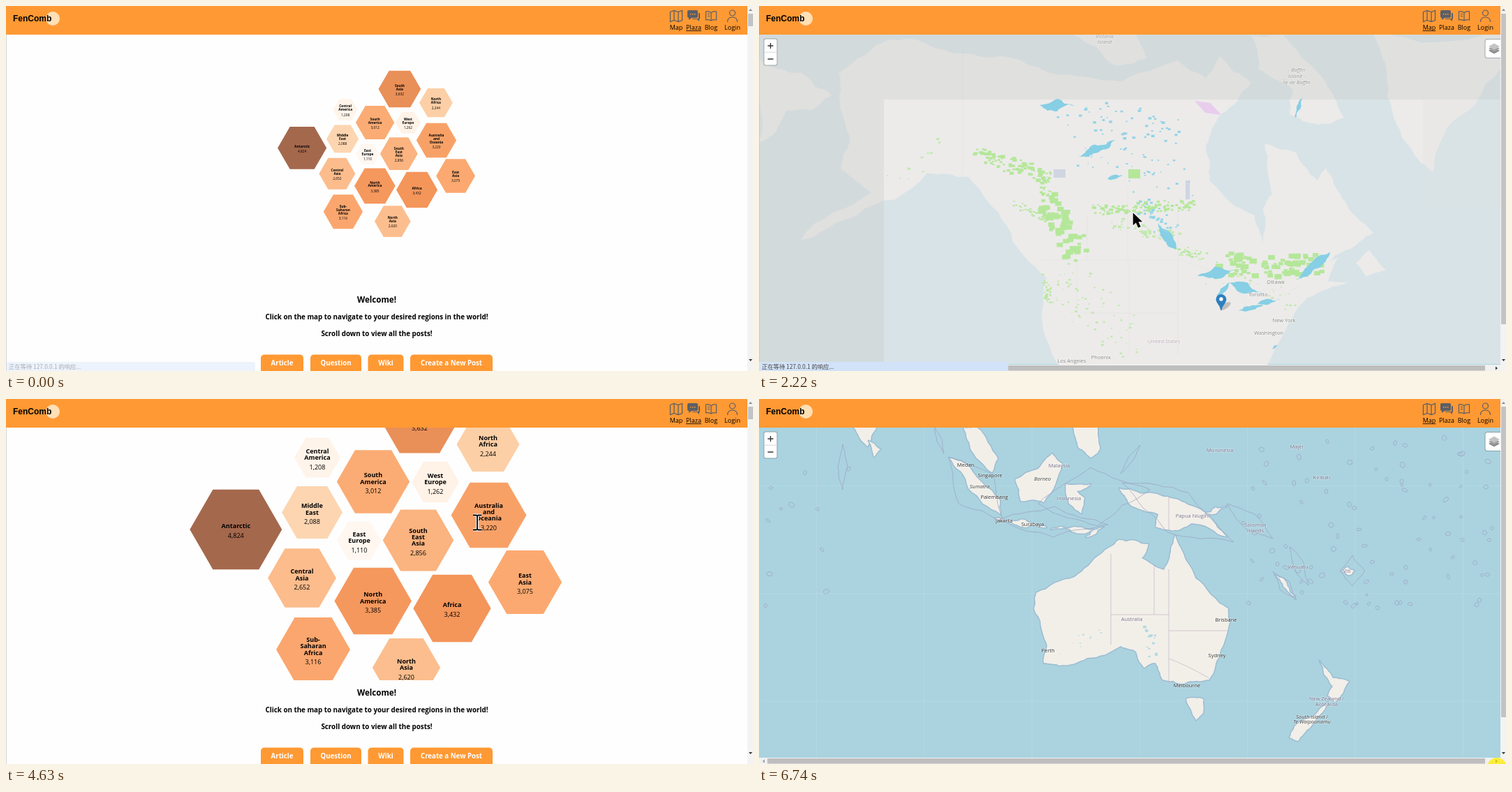
Animation of 1070 by 523 pixels, one loop 6.84 s. Source, as an HTML page with a canvas:

```html
<!DOCTYPE html>
<html lang="en">
<head>
<meta charset="utf-8">
<style>
html, body { margin: 0; overflow: hidden; background: #fff; }
canvas { display: block; width: 1070px; height: 523px; }
</style>
</head>
<body>
<canvas id="stage" width="1070" height="523"></canvas>
<script>
const g = document.getElementById('stage').getContext('2d');
const LOOP = 6840, CX = 531.5, CY = 222;
const SANS = '"Open Sans", "Noto Sans", sans-serif';
const CJK = '"Noto Sans CJK SC", "Noto Sans CJK", sans-serif';

const clamp = v => Math.max(0, Math.min(1, v));
const mix = (a, b, k) => a + (b - a) * k;
const ease = (t, a, b) => (1 - Math.cos(Math.PI * clamp((t - a) / (b - a)))) / 2;

function rng(seed) {
  return () => (seed = (seed * 16807) % 2147483647) / 2147483647;
}
function rect(x, y, w, h, color) {
  g.fillStyle = color;
  g.fillRect(x, y, w, h);
}
function round(x, y, w, h, r, color) {
  g.fillStyle = color;
  g.beginPath();
  g.roundRect(x, y, w, h, r);
  g.fill();
}
function oval(x, y, rx, ry = rx, turn = 0) {
  g.beginPath();
  g.ellipse(x, y, rx, ry, turn, 0, 7);
}
function disc(x, y, r, color) {
  g.fillStyle = color;
  oval(x, y, r);
  g.fill();
}
// Text centred vertically on y
function text(s, x, y, size, color = '#000', style = '', align = 'center', family = SANS) {
  g.font = `${style} ${size}px ${family}`;
  g.textAlign = align;
  g.fillStyle = color;
  g.fillText(s, x, y + size * 0.36);
}
const asPath = d => d instanceof Path2D ? d : new Path2D(d);
function fill(d, color) {
  g.fillStyle = color;
  g.fill(asPath(d));
}
function line(d, color, width = 1) {
  g.strokeStyle = color;
  g.lineWidth = width;
  g.stroke(asPath(d));
}
function label(list, color, style = '') {
  for (const [s, x, y] of list) {
    g.font = `${style} 7.5px ${SANS}`;
    g.textAlign = 'center';
    g.strokeStyle = 'rgba(255,255,255,.4)';
    g.lineWidth = 1.5;
    g.strokeText(s, x, y + 2.7);
    text(s, x, y, 7.5, color, style);
  }
}

// ---- Hive page ----

const cells = [
  ['South Asia', 3632, 592.5, 28],
  ['Central America', 1208, 446, 84],
  ['North Africa', 2244, 690.5, 65],
  ['South America', 3012, 526, 118.5],
  ['West Europe', 1262, 615, 119],
  ['Middle East', 2088, 438.5, 162.5],
  ['Australia and Oceania', 3220, 691.5, 166.5],
  ['Antarctic', 4824, 329.3, 187],
  ['East Europe', 1110, 506, 203],
  ['South East Asia', 2856, 590.5, 202.5],
  ['Central Asia', 2652, 424, 256.5],
  ['East Asia', 3075, 743.5, 262.5],
  ['North America', 3385, 525.7, 289.5],
  ['Africa', 3432, 639, 300],
  ['Sub- Saharan Africa', 3116, 440, 359],
  ['North Asia', 2620, 573.5, 385]
].map(([name, count, x, y]) => ({ name, count, x, y }));
const cellOf = name => cells.find(c => c.name === name);

// Colour scale by count
const scale = [[1110, 255, 247, 240], [2250, 253, 207, 166], [3050, 251, 170, 114], [3432, 244, 149, 90], [4824, 164, 104, 77]];
function shade(count) {
  const i = Math.max(1, scale.findIndex(s => s[0] >= count));
  const [a, ...from] = scale[i - 1], [b, ...to] = scale[i];
  return `rgb(${from.map((v, j) => Math.round(mix(v, to[j], (count - a) / (b - a))))})`;
}

function drawCell({ name, count, x, y }) {
  const r = 0.95 * Math.sqrt(count);
  g.beginPath();
  for (let a = 0; a < 6; a++) g.lineTo(x + r * Math.cos(a * Math.PI / 3), y + r * Math.sin(a * Math.PI / 3));
  g.fillStyle = shade(count);
  g.fill();
  const words = name.split(' '), half = 4.55 * (words.length - 1);
  words.forEach((w, i) => text(w, x, y - 4.8 - half + 9.1 * i, 9.05, '#000', 'bold'));
  text(count.toLocaleString('en-US'), x, y + 9 + half, 9.05);
}

// Zooms on the middle first, then carries the chosen cell into the middle
function hive(t, load, jump, target) {
  const z = mix(0.531, 1, ease(t, load + 285, load + 1365));
  const e = ease(t, jump, jump + 520);
  g.save();
  g.beginPath();
  g.rect(260, 41, 543, 362);
  g.clip();
  g.translate(CX + (1 - e) * z * (target.x - CX), CY + (1 - e) * z * (target.y - CY));
  g.scale(z + 2 * e, z + 2 * e);
  g.translate(-target.x, -target.y);
  cells.forEach(drawCell);
  g.restore();
}

function header(active) {
  rect(0, 0, 1062, 41, '#ff9933');
  disc(67, 18, 10, '#ffdfb5');
  text('FenComb', 10, 18, 12, '#000', 'bold', 'left', '"Liberation Sans", sans-serif');
  const ink = '#5c5f66';
  line('M951.5 8.5l5.5-2 6 2 5.5-2v14l-5.5 2-6-2-5.5 2zM957 6.5v14M963 8.5v14', ink, 1.3);
  fill('M978 6h11q2 0 2 2v7q0 2-2 2h-7l-4 3v-3q-2 0-2-2V8q0-2 2-2z', ink);
  fill('M992 10h1q1 0 1 1v7q0 1-1 1v3l-3-3h-8l2-1h8z', ink);
  for (const x of [980, 983, 986]) rect(x, 11, 1.5, 1.5, '#ff9933');
  line('M1010 9.5q-4-2.5-7.5-1.5v12q3.5-1 7.5 1 3.5-2 7.5-1V8q-3.5-1-7.5 1.5zv11.5M1005 11l3 1M1005 14l3 1', ink, 1.2);
  line('M1044.5 10a4 4 0 1 0-8 0a4 4 0 1 0 8 0M1033.5 23q0-7 7-7t7 7', ink, 1.2);
  for (const [s, x] of [['Map', 960], ['Plaza', 985], ['Blog', 1010], ['Login', 1040.5]]) {
    text(s, x, 31, 9);
    const w = g.measureText(s).width;
    if (s === active) rect(x - w / 2, 35, w, 0.8, '#000');
  }
}

function scrollbar(h) {
  rect(1062, 0, 8, 523, '#f3f3f3');
  rect(1063, 11, 7, h, '#c3c3c6');
  fill('M1064 7h5l-2.5-3z', '#888');
  fill('M1064 506h5l-2.5 3z', '#333');
}

function status(alpha) {
  g.globalAlpha = alpha;
  round(0, 510, 357, 13, [0, 3, 0, 0], '#d2e2f8');
  text('正在等待 127.0.0.1 的响应...', 4, 517, 8.3, '#444', '', 'left', CJK);
  g.globalAlpha = 1;
}

function plaza(t, load, jump, target) {
  rect(0, 0, 1070, 523, '#fefefe');
  hive(t, load, jump, cellOf(target));
  header('Plaza');
  const age = t - load;
  g.globalAlpha = clamp((age - 200) / 100) * clamp((1100 - age) / 120);
  round(487, 9, 89, 19, 3, '#c5525b');
  text('Must be logged in!', 531.5, 18.5, 8.2, '#fff');
  g.globalAlpha = 1;
  text('Welcome!', 531, 421, 11.6, '#000', 'bold');
  text('Click on the map to navigate to your desired regions in the world!', 531, 445, 9.8, '#000', 'bold');
  text('Scroll down to view all the posts!', 531, 469, 9.8, '#000', 'bold');
  for (const [s, x, w] of [['Article', 365, 61], ['Question', 436, 73], ['Wiki', 518.5, 51], ['Create a New Post', 579, 118]]) {
    round(x, 499.5, w, 24, [5, 5, 0, 0], '#ff9933');
    text(s, x + w / 2, 511.5, 9.7, '#fff', 'bold');
  }
  rect(0, 41, 0.8, 482, '#ccc');
  scrollbar(18);
  if (load === 0) status(0.4 * clamp((200 - t) / 100));
}

// ---- Maps ----

const SEA = '#aad3df', LAND = '#f2efe9';
const rough = rng(31);

// Closed shoreline: a few key points, roughened by midpoint displacement
function coast(points, amount = 0.09) {
  const n = points.match(/[\d.]+/g).map(Number);
  let p = n.filter((_, i) => i % 2 === 0).map((x, i) => [x, n[2 * i + 1]]);
  for (let pass = 0; pass < 3; pass++) {
    p = p.flatMap(([x, y], i) => {
      const [u, v] = p[(i + 1) % p.length], k = (rough() - 0.5) * 2 * amount;
      return [[x, y], [(x + u) / 2 + (v - y) * k, (y + v) / 2 - (u - x) * k]];
    });
  }
  return new Path2D('M' + p.map(q => q.join(' ')).join('L') + 'z');
}
// Sliver from a to b, swelling by w on each side
function lens(ax, ay, bx, by, w, amount = 0.15) {
  const k = w / Math.hypot(bx - ax, by - ay), mx = (ax + bx) / 2, my = (ay + by) / 2;
  const dx = (by - ay) * k, dy = (ax - bx) * k;
  return coast(`${ax} ${ay}, ${mx + dx} ${my + dy}, ${bx} ${by}, ${mx - dx} ${my - dy}`, amount);
}
// Blocky patches strewn along a line
function strew(r, ax, ay, bx, by, spread, n = 10 + 0.6 * Math.hypot(bx - ax, by - ay), size = spread * 0.7) {
  for (let i = 0; i < n; i++) {
    const q = r(), w = size * mix(0.4, 1, r());
    g.fillRect(mix(ax, bx, q) + (r() - 0.5) * 2 * spread - w / 2, mix(ay, by, q) + (r() - 0.5) * 2 * spread - w / 3, w, w * 0.7);
  }
}

const america = [
  '0 75, 60 95, 104 128, 75 150, 40 150, 20 185, 0 195',
  '115 95, 185 48, 290 68, 400 88, 520 108, 600 78, 640 103, 660 72, 705 110, 662 155, 640 200, 645 250, 710 300, 720 340, 722 290, 735 270, 724 198, 770 210, 800 250, 812 232, 835 275, 880 325, 840 350, 785 380, 830 360, 815 395, 845 395, 785 418, 765 445, 715 530, 440 530, 405 440, 412 390, 355 315, 300 245, 240 240, 140 300, 60 335, 160 268, 118 235, 130 195, 115 130',
  '855 368, 875 350, 898 378, 870 388',
  '705 41, 750 41, 805 100, 838 160, 800 170, 760 155, 765 120, 715 90',
  '450 41, 540 41, 555 75, 510 85',
  '880 41, 900 130, 935 205, 965 238, 985 175, 1062 90, 1062 41'
].map(p => coast(p));
const lakes = [
  [402, 142, 452, 142, 9], [457, 216, 511, 192, 6], [497, 248, 522, 241, 3], [572, 311, 597, 349, 7],
  [628, 386, 682, 378, 9], [655, 418, 674, 396, 4], [674, 397, 722, 412, 8], [687, 437, 722, 429, 3],
  [714, 427, 746, 420, 4], [773, 391, 818, 352, 6], [768, 160, 778, 132, 3], [735, 491, 743, 485, 2]
].map(a => lens(...a));
const woods = [
  [418, 285, 455, 350, 17], [366, 282, 410, 308, 5], [312, 208, 345, 225, 8], [350, 225, 415, 245, 10],
  [408, 245, 412, 275, 7], [480, 293, 625, 285, 8], [600, 350, 638, 358, 6], [670, 368, 700, 372, 16],
  [730, 375, 795, 368, 15], [412, 395, 415, 425, 5]
];

function northAmerica(k) {
  rect(0, 41, 1062, 482, SEA);
  america.forEach(d => fill(d, LAND));
  line('M292 65V240M405 364H605L680 390 700 435 745 420 775 400M470 300V364M528 260V364M600 290V364M455 364V440H600M530 364V500M600 364V500', 'rgba(160,140,160,.22)');
  // Loading tiles
  const old = `rgba(221,221,221,${0.8 * k})`;
  rect(0, 41, 1062, 93, old);
  rect(0, 134, 179, 379, old);
  rect(179, 134, 883, 379, `rgba(235,235,235,${0.72 * k})`);
  rect(951, 134, 111, 154, `rgba(221,221,221,${0.2 * k})`);
  const r = rng(77);
  g.fillStyle = '#b5e79a';
  for (const w of woods) strew(r, ...w);
  rect(529, 234, 17, 13, '#b5e79a');
  g.fillStyle = '#c4e8b0';
  strew(r, 420, 390, 540, 480, 30, 70, 4);
  strew(r, 510, 308, 600, 335, 10, 45, 5);
  strew(r, 660, 380, 780, 410, 30, 35, 4);
  strew(r, 190, 255, 270, 195, 12, 10, 5);
  fill(lens(624, 136, 662, 156, 8, 0), '#e9cdec');
  rect(422, 234, 17, 12, '#cfd6e2');
  rect(611, 250, 6, 27, '#cfd6e2');
  lakes.forEach(d => fill(d, '#86cfe4'));
  g.fillStyle = '#93d3e6';
  strew(r, 440, 150, 600, 180, 22, 50, 5);
  strew(r, 470, 210, 610, 250, 25, 40, 4);
  strew(r, 540, 270, 600, 330, 16, 35, 5);
  label([['Victoria', 495, 43], ['Island', 495, 51], ['- Baffin', 770, 91], ['Island -', 770, 100], ['Île de Baffin', 770, 109]], '#999', 'italic');
  label([['United States', 580, 480]], '#b9a9b5');
  label([['Ottawa', 740, 395], ['Toronto', 715, 413], ['New York', 752, 450], ['Washington', 730, 468], ['Phoenix', 490, 503], ['Los Angeles', 448, 508]], '#888');
  g.fillStyle = 'rgba(60,60,60,.25)';
  oval(668, 430, 9, 3.5, -0.6);
  g.fill();
  fill('M662 437Q660 430 656 425A7.5 7.5 0 1 1 668 425Q664 430 662 437z', '#2e7fbd');
  disc(662, 420, 2.7, '#fff');
}

const oceania = [
  '397 278, 452 255, 490 222, 515 202, 558 208, 548 228, 580 245, 590 215, 596 195, 612 232, 645 278, 672 300, 674 320, 660 365, 645 402, 608 408, 578 402, 568 378, 552 385, 540 362, 518 354, 470 371, 430 382, 408 378, 412 350, 394 300',
  '612 430, 637 430, 636 450, 626 460',
  '516 128, 545 135, 585 140, 625 155, 645 168, 670 197, 620 178, 600 188, 568 183, 572 165, 530 150',
  '367 115, 400 100, 420 78, 434 92, 408 148, 375 146',
  '272 84, 295 92, 345 145, 346 165, 300 128',
  '293 41, 312 41, 342 85, 334 105, 305 75',
  '440 122, 475 122, 455 132, 466 142, 462 164, 444 150',
  '450 41, 485 41, 488 72, 475 84, 458 70',
  '803 375, 822 400, 845 405, 825 435, 815 425, 822 412',
  '815 434, 790 470, 772 490, 760 485, 768 468',
  '136 41, 168 41, 155 68',
  '157 60, 174 72, 165 83'
].map(p => coast(p));
const isles = [
  [338, 171, 412, 184, 5], [418, 187, 478, 187, 3], [468, 198, 494, 183, 3], [640, 164, 670, 154, 4],
  [740, 252, 768, 283, 3], [835, 247, 853, 246, 6]
].map(a => lens(...a));
const waters = [
  [120, 65, 120, 130, 7], [518, 107, 546, 66, 4], [252, 41, 265, 78, 4], [670, 150, 736, 200, 12],
  [760, 212, 787, 267, 8], [736, 247, 770, 288, 9], [832, 246, 868, 246, 22], [272, 84, 350, 175, 32],
  [345, 172, 500, 180, 22], [400, 150, 560, 130, 42], [520, 120, 680, 205, 32]
].map(a => lens(...a, 0.06));

function australia(k) {
  rect(0, 41, 1062, 482, SEA);
  for (let i = 0; i < 7; i++) rect(82 + 154.3 * i, 41, 1, 482, 'rgba(255,255,255,.12)');
  for (let i = 0; i < 3; i++) rect(0, 124 + 154.3 * i, 1062, 1, 'rgba(255,255,255,.12)');
  const border = '#9d9fbd', r = rng(4242);
  g.strokeStyle = border;
  g.lineWidth = 0.7;
  for (let i = 0; i < 95; i++) {
    oval(i % 9 ? mix(690, 1050, r()) : mix(5, 130, r()), mix(55, 300, r()), 1.5 + r() * 3, 1.5 + r() * 2, r() * 3);
    g.stroke();
  }
  g.lineJoin = 'round';
  for (const d of [...oceania, ...isles]) {
    line(d, '#9cbcd2', 3);
    fill(d, LAND);
  }
  waters.forEach(d => line(d, border, 0.7));
  line('M504 222V352M566 238V309M504 309H587M587 244V408M587 332H672M587 372Q610 380 645 400M587 140V188', '#cbbcc6', 0.8);
  g.fillStyle = '#b0d9e2';
  strew(r, 560, 325, 562, 380, 8, 16, 5);
  strew(r, 435, 355, 495, 320, 14, 10, 3);
  g.globalAlpha = clamp(k) * 0.8;
  g.fillStyle = '#c5e8b0';
  strew(r, 285, 92, 340, 155, 4, 18, 4);
  g.globalAlpha = 1;
  // Loading tiles
  const veil = (x, y, w, h, a, c = '221,221,221') => rect(x, y, w, h, `rgba(${c},${clamp(a * k)})`);
  veil(0, 41, 391, 391, 0.42, '220,235,239');
  veil(391, 41, 309, 237, 0.26);
  veil(700, 41, 362, 237, 0.55);
  veil(391, 278, 671, 154, 0.58);
  veil(0, 432, 1062, 82, 0.6);
  label([['Medan', 296, 94], ['Singapore', 331, 109], ['Palembang', 337, 140], ['Jakarta', 351, 174], ['Surabaya', 392, 179], ['Brisbane', 669, 316], ['Perth', 414, 360], ['Sydney', 656, 367], ['Melbourne', 613, 410]], '#333');
  label([['Malaysia', 430, 95], ['Indonesia', 444, 142], ['Micronesia', 660, 73], ['Majeļ', 770, 68], ['Kiribati', 806, 112], ['Papua Niugini', 621, 167], ['Solomon', 711, 180], ['Islands', 711, 188], ['Vanuatu', 772, 240], ['Viti', 842, 246], ['Australia', 534, 315], ['New Zealand /', 813, 429], ['Aotearoa', 813, 437]], '#77708c');
  label([['Sumatra', 316, 125], ['Borneo', 406, 114], ['South Island /', 792, 455], ['Te Waipounamu', 792, 462]], '#444', 'italic');
}

function mapPage(draw, k) {
  rect(0, 0, 1070, 523, '#ddd');
  g.save();
  g.beginPath();
  g.rect(0, 41, 1062, 473);
  g.clip();
  draw(k);
  g.restore();
  round(6.5, 46.5, 20, 39, 3, 'rgba(90,100,105,.45)');
  round(7.5, 47.5, 18, 37, 2, '#fff');
  rect(7.5, 65.7, 18, 0.8, '#ccc');
  line('M12.5 57h8M16.5 53v8M12.5 76h8', '#333', 1.4);
  round(1039.5, 47, 24, 28, [4, 0, 0, 4], 'rgba(90,100,105,.45)');
  round(1040.5, 48, 22, 26, [3, 0, 0, 3], '#fff');
  ['#8c8c8c', '#a4a4a4', '#c4c4c4'].forEach((c, i) => fill(`M1045 ${64 - 3 * i}l8-4.5 8 4.5-8 4.5z`, c));
  header('Map');
  rect(0, 41, 0.8, 473, '#ccc');
  rect(0, 514, 1070, 9, '#f1f1f1');
  rect(12, 515, 1028, 7.5, '#bebebe');
  fill('M8 516.5v5l-3-2.5z', '#999');
  fill('M1055 516.5v5l3-2.5z', '#333');
  scrollbar(445);
}

// ---- Pointer: time, x, y ----

const path = [[700, 1080, 520], [1300, 535, 294], [2700, 536, 297], [2900, 15, -30], [3280, 300, -30], [3600, 631, 197], [3700, 631, 197], [4400, 675, 177], [6100, 675, 177], [6700, 1057, 524]];

function cursor(t) {
  if (t < 700) return;
  if (t > 6600) return disc(1057, 528, 14, 'rgba(255,235,0,.75)');
  const i = path.findIndex(p => p[0] > t);
  const [ta, xa, ya] = path[i - 1], [tb, xb, yb] = path[i], e = ease(t, ta, tb);
  g.save();
  g.translate(mix(xa, xb, e), mix(ya, yb, e));
  if ((t > 1300 && t < 2120) || (t > 4350 && t < 6120)) {
    const beam = 'M-6-10.5H-1.5L0-9.5 1.5-10.5H6M0-9.5V9.5M-6 10.5H-1.5L0 9.5 1.5 10.5H6';
    line(beam, '#fff', 4);
    line(beam, '#000', 1.8);
  } else {
    const arrow = 'M0 0V18L4.2 14.2 7.5 21.5 11 20 7.8 13H13.5z';
    line(arrow, '#fff', 1.5);
    fill(arrow, '#000');
  }
  g.restore();
}

function frame(now) {
  const t = now % LOOP;
  if (t < 2120) plaza(t, 0, 1380, 'North America');
  else if (t < 3220) {
    mapPage(northAmerica, clamp((2700 - t) / 480));
    if (t < 2700) status(1);
  } else if (t < 5340) plaza(t, 3220, 4640, 'Australia and Oceania');
  else mapPage(australia, Math.max(0, (5840 - t) / 400));
  cursor(t);
  requestAnimationFrame(frame);
}
requestAnimationFrame(frame);
</script>
</body>
</html>
```
